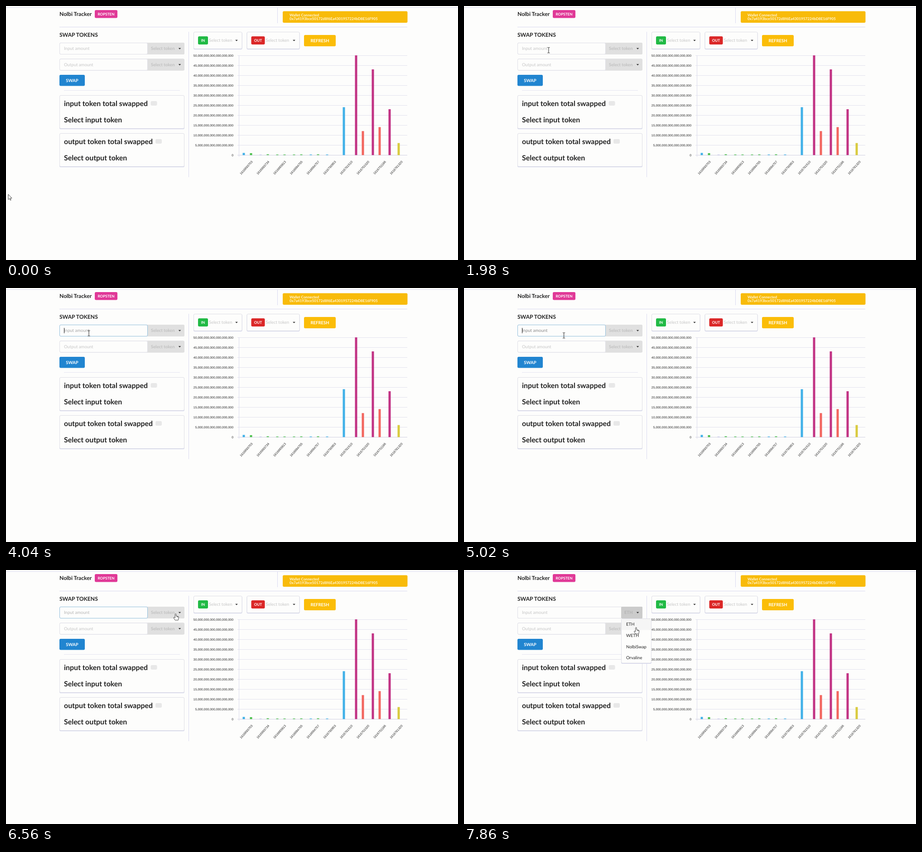
An HTML page for the animation above (8 s loop, 998 by 561 pixels).

```html
<!DOCTYPE html>
<html lang="en">
<head>
<meta charset="utf-8">
<title>Nolbi Tracker</title>
<style>
html, body { margin: 0; width: 100%; height: 100%; overflow: hidden; background: #fdfdfc; }
svg { display: block; width: 100vw; height: 100vh; }
text { font: 9.54px Lato, sans-serif; fill: #222; text-rendering: geometricPrecision; white-space: pre; }
.h3 { font-size: 12.1px; font-weight: 700; }
.h2 { font-size: 15.9px; font-weight: 700; }
.tag { font-size: 8.17px; font-weight: 700; fill: #fff; }
.btn { font-weight: 700; fill: #fff; text-anchor: middle; }
.ph { fill: #c6c6c6; }
.sel { font-weight: 700; fill: #c0c0c0; }
.axis { font: 6.9px "Liberation Sans", Arial, sans-serif; text-anchor: end; }
</style>
</head>
<body>
<svg id="stage" viewBox="0 0 998 561"></svg>
<script>
const rect = (x, y, w, h, fill, more = '') =>
  `<rect x="${x}" y="${y}" width="${w}" height="${h}" fill="${fill}" ${more}/>`;
const text = (x, y, s, cls = '', more = '') => `<text x="${x}" y="${y}" class="${cls}" ${more}>${s}</text>`;
const round = (x, y, w, h, fill) => rect(x, y, w, h, fill, 'rx="2.7"');
const box = (x, y, w, h, id = '') =>
  rect(x + .5, y + .5, w - 1, h - 1, '#fdfdfc', `rx="2.5" stroke="#dedee6" ${id && `id="${id}"`}`);
const card = (x, y, w, h) => round(x, y + 1, w, h, '#d3d5ec') + box(x, y, w, h);
const caret = (x, y) => `<path d="M${x - 2.8} ${y - 1.3}h5.6l-2.8 3z" fill="#333"/>`;
const line = (x, y, w, h) => rect(x, y, w, h, '#dadaf0');

const field = (y, label, id) =>
  box(118, y, 276, 26) + `<path d="M312 ${y}h79.5q2.5 0 2.5 2.5v21q0 2.5-2.5 2.5H312z" fill="#e0e0e0"/>` +
  box(118, y, 195, 26, id) + text(128, y + 16.3, label, 'ph', id && `id="${id}Text"`) +
  text(320, y + 16.3, 'Select token', 'sel') + caret(383.5, y + 13);

const filter = (x, w, tagW, color, tag) =>
  card(x, 57, w, 38) + round(x + 10, 67, tagW, 18, color) +
  text(x + 10 + tagW / 2, 79, tag, 'tag', 'text-anchor="middle"') +
  text(x + 12 + tagW, 79.3, 'Select token', 'ph') + caret(x + w - 12.5, 76);

const total = (y, kind, tagX) =>
  card(118, y, 276, 74) + text(128, y + 23.6, kind + ' token total swapped', 'h2') +
  round(tagX, y + 13, 14, 10, '#e8e8e8') + text(128, y + 60, `Select ${kind} token`, 'h2');

function chart() {
  let s = '';
  for (let i = 0; i <= 10; i++) {
    const y = 109 + 22 * i, n = 50 - 5 * i;
    s += rect(511, y, 375, 1, i < 10 ? '#e2e2ee' : '#d0d0e2') +
      text(502, y + 2.8, n ? n + ',000'.repeat(6) : '0', 'axis');
  }
  s += rect(514, 109, 1, 224, '#dcdcec');
  const blue = '#41b1e8', green = '#4fc24f', pink = '#c23384', red = '#f2665f', pale = '#bcbce8';
  const bars = [[525, 324.5, blue], [541, 325, green], [562, 328.3, pale], [578, 327.5, green],
    [599, 328, green], [615, 328, green], [636, 328, green], [652, 327.8, green], [673, 328, blue],
    [689, 327.6, green], [709, 328, blue], [746, 223.5, blue], [773, 109, pink], [788, 276.3, red],
    [810, 140, pink], [825, 267.5, red], [847, 228, pink], [867, 302.7, '#d9cb3f']];
  for (const [x, y, c] of bars) s += rect(x - 2.5, y, 5, 329.3 - y, c);
  ['1616693703', '1616693734', '1616693813', '1616694755', '1616694757',
    '1616750953', '1616761510', '1616751020', '1616751166', '1616761320'].forEach((label, i) => {
    s += text(0, 0, label, 'axis', `transform="translate(${545 + 36.8 * i} 344.5) rotate(-48)"`);
  });
  return s;
}

const menu =
  box(118, 81, 276, 26) + text(128, 97.3, 'Input amount', 'ph') +
  rect(347, 81, 47, 26, '#cbcbcb', 'rx="2"') + text(354, 97.3, 'ETH', 'sel', 'style="fill:#b4b4b4"') +
  caret(383.5, 94) + card(347, 107, 67, 99) + rect(348, 108, 65, 24.5, '#f5f5f5') +
  ['ETH', 'WETH', 'NolbiSwap', 'Orvaline'].map((s, i) => text(358, 123.3 + 24.6 * i, s)).join('');

const cursors =
  `<path id="arrow" d="M0 0V11.6L2.7 9.1 4.5 13.1 6.2 12.4 4.4 8.4H8Z" fill="#fff" stroke="#333" stroke-width=".9"/>
  <path id="beam" d="M-2.5-6H-.6L0-5.4.6-6H2.5M0-5.4V5.4M-2.5 6H-.6L0 5.4.6 6H2.5" fill="none" stroke="#222"/>
  <path id="hand" d="M-1.2 1Q0-.8 1.2 1V5.2L6 6.4Q7 6.8 6.8 8.5L5.7 14.5H-1.2L-4.3 9.5Q-4.4 7.7-2.7 8.1L-1.2 9.6ZM3 5.8V8M5 6.3V8.4"
    fill="#fff" stroke="#333" stroke-width=".9" stroke-linejoin="round"/>`;

stage.innerHTML =
  line(0, 3, 998, 1) + line(118, 46, 768, 1) + line(599, 4, 1, 34) + line(403, 57, 1, 321) +
  text(118, 21.7, 'Nolbi Tracker', 'h3') + round(196, 9, 50, 17.5, '#e03997') +
  text(221, 20.7, 'ROPSTEN', 'tag', 'text-anchor="middle"') +
  round(611, 11.5, 275.5, 25.5, '#f8bb0a') + text(626, 22.6, 'Wallet Connected', 'tag', 'style="fill:#fff6da"') +
  text(626, 30.7, '0x7a4193bce50172d8f6Ea4301957224bD8E16F905', 'tag', 'style="fill:#fff6da"') +
  text(118, 67.8, 'SWAP TOKENS', 'h3') +
  field(81, 'Input amount', 'input') + field(116.5, 'Output amount', '') +
  rect(128, 88, 1, 12, '#222', 'id="bar"') +
  round(118, 152, 56, 24.5, '#2185d0') + text(146, 167.5, 'SWAP', 'btn') +
  rect(128, 186, 256, 1, '#e4e4f2') +
  total(197, 'input', 319.5) + total(281, 'output', 330) +
  filter(414, 107.5, 22, '#21ba45', 'IN') + filter(531.5, 117, 30, '#db2828', 'OUT') +
  round(658, 64, 70, 25, '#fbbd08') + text(693, 79.8, 'REFRESH', 'btn') +
  chart() + `<g id="menu">${menu}</g><g id="mouse">${cursors}</g>`;

const el = id => document.getElementById(id);
const show = (id, on) => { el(id).style.display = on ? '' : 'none'; };
const ramp = (t, a, b) => Math.min(1, Math.max(0, (t - a) / (b - a)));

// time, x, y of the pointer's hot spot
const path = [[0, 5, 416], [20, 5, 416], [580, 262, 244], [940, 262, 244], [1380, 205, 160], [1700, 190, 98],
  [1800, 190, 98], [2260, 182, 97], [2400, 182, 97], [2780, 184, 98], [3360, 184, 98], [4040, 183, 100],
  [4640, 183, 100], [5440, 262, 110], [5580, 327, 109], [6180, 368, 99], [6320, 368, 99], [6560, 374.5, 96.3],
  [7120, 376, 98], [7500, 382, 133], [7700, 380, 126.7], [8000, 380, 126.7]];
const focusAt = 3980, caretOff = 5220, openAt = 6640;

function pointer(t) {
  const i = path.findIndex(p => p[0] > t), [t0, x0, y0] = path[i - 1], [t1, x1, y1] = path[i];
  const k = (t - t0) / (t1 - t0);
  return [x0 + (x1 - x0) * k, y0 + (y1 - y0) * k];
}

function draw(now) {
  const t = now % 8000, [x, y] = pointer(t), open = t >= openAt;
  const inRow = x > 118 && x < 394 && (y > 81 && y < 107 || y > 117 && y < 142);
  const kind = open && x > 347 && y > 81 || inRow && x > 312 ? 'hand' : inRow ? 'beam' : 'arrow';
  for (const id of ['arrow', 'beam', 'hand']) show(id, id === kind);
  el('mouse').setAttribute('transform', `translate(${x} ${y})`);

  const dark = ramp(t, focusAt, focusAt + 120) * (1 - ramp(t, 6460, 6600));
  const gray = 198 - 62 * dark;
  el('inputText').style.fill = `rgb(${gray},${gray},${gray})`;
  el('input').style.stroke = t >= focusAt && !open ? '#92bfdc' : '';
  show('bar', t >= focusAt && t < caretOff);
  show('menu', open);
  requestAnimationFrame(draw);
}
requestAnimationFrame(draw);
</script>
</body>
</html>
```
